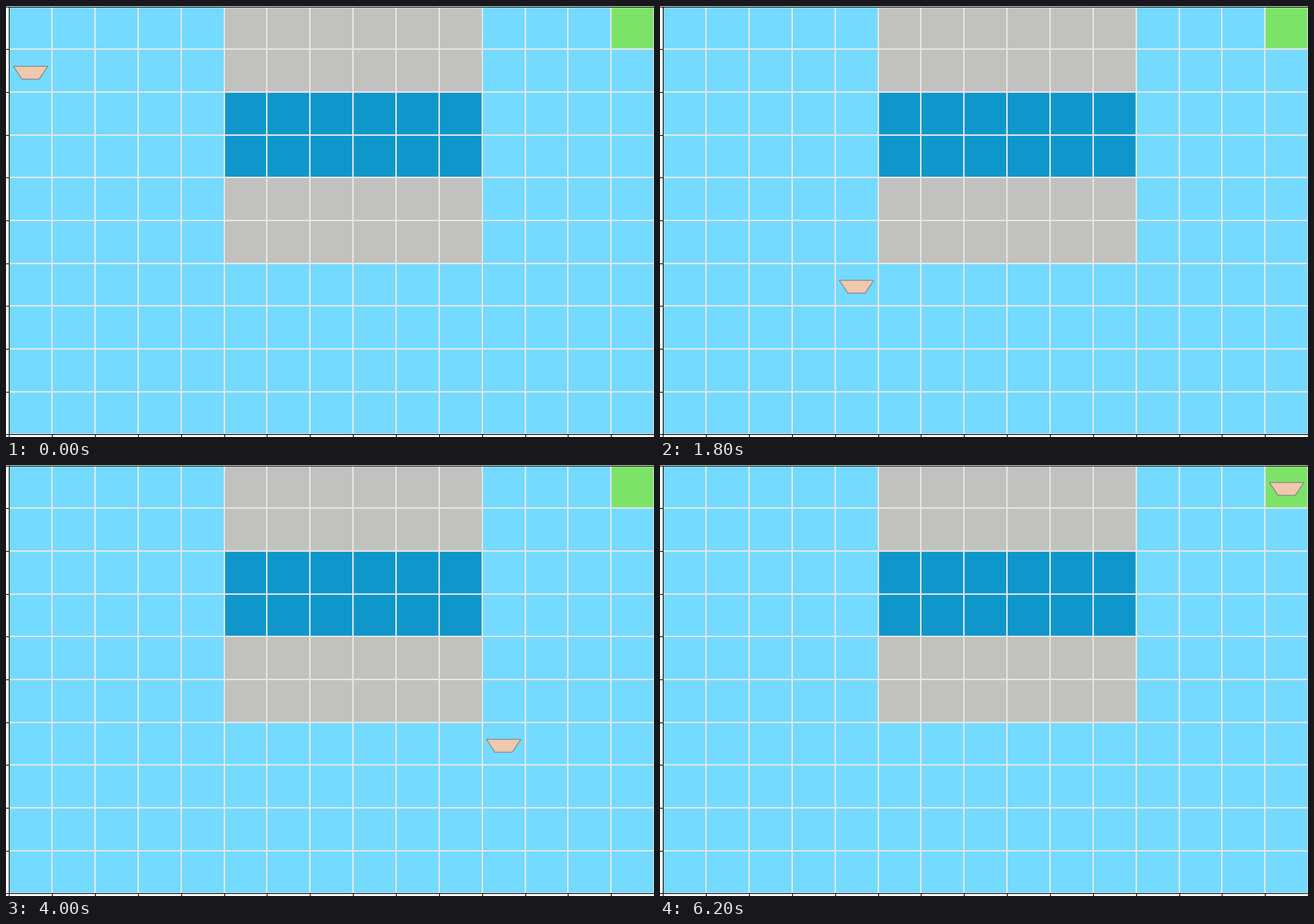
Recreate the animation shown at these times as a matplotlib script. Size 917 by 611 pixels, loop 6.4 s.

```python
from itertools import accumulate

import matplotlib.pyplot as plt
from matplotlib.animation import FuncAnimation
from matplotlib.patches import Polygon, Rectangle

WIDTH, HEIGHT, DPI = 917, 611, 100
COLS, ROWS = 15, 10
LEFT, RIGHT, TOP, BOTTOM = 4.3, 917.2, 0.5, 607.4
STEP_MS = 200

WATER, ROCK, DEEP, GOAL = "#74daff", "#c1c1bf", "#0f97cb", "#7ce368"
GRID, HULL, HULL_EDGE = "#e6e6e6", "#efc8ae", "gray"

# One letter per step: down, right, up, left.
ROUTE = "DDDDD" "R" "RRRDRR" "R" "URRD" "R" "RUURU" "U" "ULU" "RRR" "U"
MOVES = {"D": (0, 1), "R": (1, 0), "U": (0, -1), "L": (-1, 0)}
START = (0, 1)
HULL_SHAPE = [(0.1, 0.4), (0.9, 0.4), (0.7, 0.7), (0.3, 0.7)]


def step(cell, letter):
    dx, dy = MOVES[letter]
    return cell[0] + dx, cell[1] + dy


def hull_at(cell):
    col, row = cell
    return [(col + x, row + y) for x, y in HULL_SHAPE]


def fill(col, row, width, height, color):
    ax.add_patch(Rectangle((col, row), width, height, fc=color, lw=0))


path = list(accumulate(ROUTE, step, initial=START))

fig = plt.figure(figsize=(WIDTH / DPI, HEIGHT / DPI), dpi=DPI, facecolor="white")
ax = fig.add_axes([LEFT / WIDTH, 1 - BOTTOM / HEIGHT,
                   (RIGHT - LEFT) / WIDTH, (BOTTOM - TOP) / HEIGHT])
ax.set(xlim=(0, COLS), ylim=(ROWS, 0), facecolor=WATER,
       xticks=range(COLS + 1), yticks=range(ROWS + 1))
ax.tick_params(labelbottom=False, labelleft=False)
ax.grid(color=GRID, lw=1.5)

fill(5, 0, 6, 2, ROCK)
fill(5, 2, 6, 2, DEEP)
fill(5, 4, 6, 2, ROCK)
fill(14, 0, 1, 1, GOAL)

boat = Polygon(hull_at(START), fc=HULL, ec=HULL_EDGE, lw=0.8, zorder=3)
ax.add_patch(boat)


def update(frame):
    boat.set_xy(hull_at(path[frame]))
    return (boat,)


animation = FuncAnimation(fig, update, frames=len(path), interval=STEP_MS,
                          repeat=True, repeat_delay=0)
plt.show()
```
